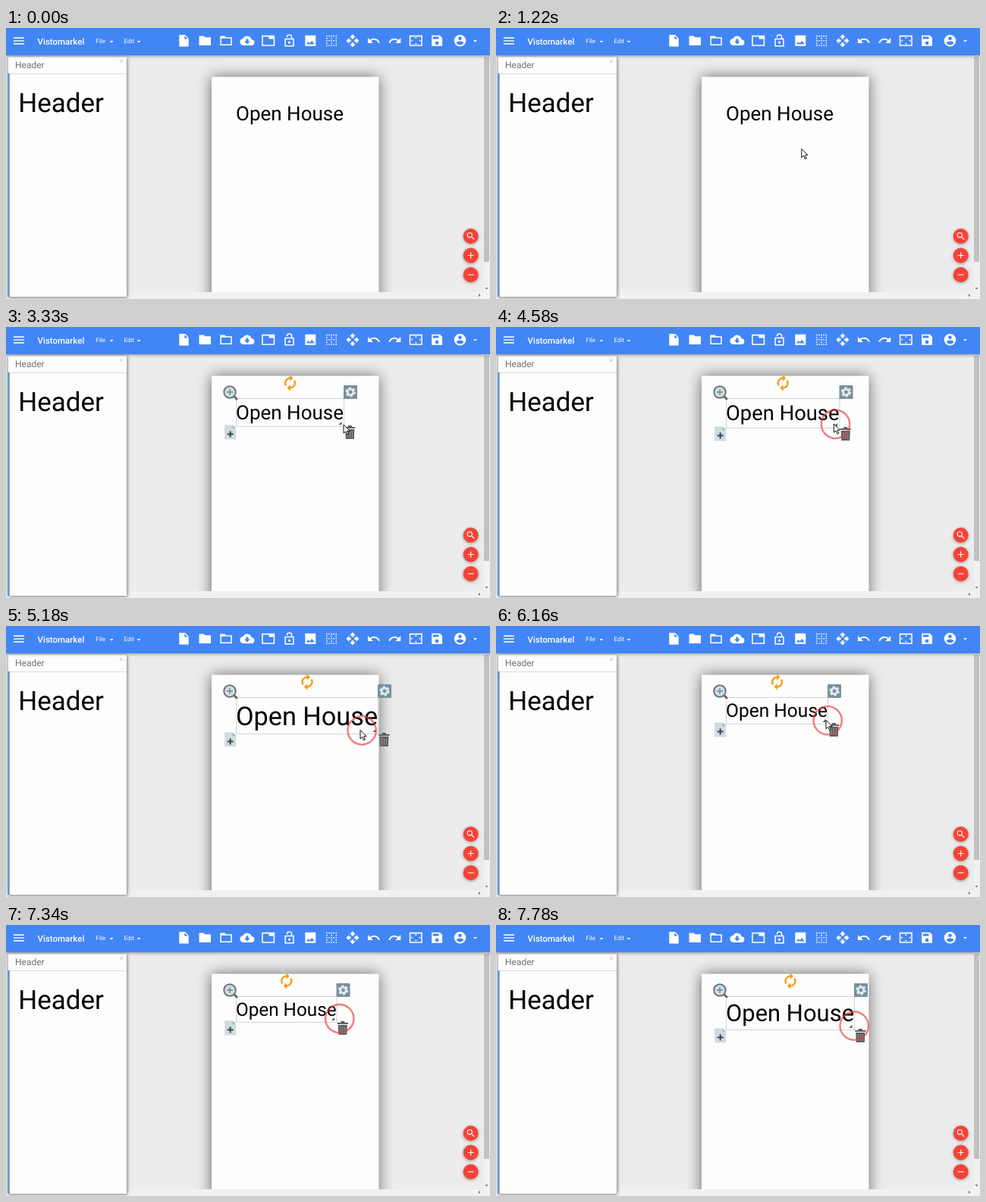
An HTML page that plays this animation: 638 by 358 pixels, repeating every 8 s.

```html
<!DOCTYPE html>
<html lang="en">
<head>
<meta charset="utf-8">
<title>Resize a text block</title>
<style>
  html, body { margin: 0; width: 100%; height: 100%; overflow: hidden; background: #ececec; }
  svg { display: block; width: 638px; height: 358px; font-family: Roboto, sans-serif; text-rendering: geometricPrecision; }
  .soft { filter: blur(2px); }
  .page-shadow { filter: blur(9.5px); }
</style>
</head>
<body>
<svg viewBox="0 0 638 358">
  <rect width="638" height="358" fill="#ececec"/>
  <rect class="page-shadow" x="271" y="65" width="220" height="320" opacity=".58"/>
  <rect x="271" y="64.5" width="220.5" height="300" fill="#fdfdfd"/>

  <rect id="hover" x="303" y="94" width="143" height="37.5" fill="#f1f4d8"/>
  <text id="label" x="303">Open House</text>
  <g id="handles">
    <rect id="outline" x="303.5" y="94.5" fill="none" stroke="#aaa" stroke-dasharray="1 1"/>
    <path id="corner" d="M2-2V2H-2z" fill="#555"/>
    <g transform="translate(295 86)">
      <path d="M5 5l4 4" stroke="#666" stroke-width="3" stroke-linecap="round"/>
      <circle r="7.7" fill="#d3e0e3" stroke="#6d7477" stroke-width="2"/>
      <path d="M-4 0H4M0-4V4" stroke="#7d9a9d" stroke-width="1.8"/>
    </g>
    <g id="add">
      <path d="M-7.5-9.5H3L7.5-5V9.5H-7.5z" fill="#cfdcdf"/>
      <path d="M3-9.5V-5H7.5z" fill="#a5b8bd"/>
      <path d="M-4 2.5H4M0-1.500V6.500" stroke="#37474f" stroke-width="2"/>
    </g>
    <g id="gear" fill="none" stroke="#dfe8ea">
      <rect x="-9" y="-9" width="18" height="18" rx="1" fill="#78909c" stroke="none"/>
      <circle r="3.9" stroke-width="3"/>
      <circle r="5.6" stroke-width="2.4" stroke-dasharray="2.93"/>
    </g>
    <g id="trash" fill="#5f5f5f">
      <path d="M-7-7H-2.500V-9H2.500V-7H7V-5H-7zM-6-4H6L5.500 9H-5.500z"/>
      <path d="M-3-2V7M0-2V7M3-2V7" stroke="#999"/>
    </g>
    <g id="turn"></g>
  </g>

  <path d="M0 349H638V358H0zM630 36H638V358H630z" fill="#f1f1f1"/>
  <rect x="630" y="38" width="7" height="271" fill="#c1c1c1"/>
  <path d="M631.500 343h4l-2 2.500zM623 351v4l2.500-2z" fill="#777"/>

  <rect class="soft" x="3" y="39" width="157" height="317" opacity=".5"/>
  <rect x="3" y="38" width="156" height="317" fill="#fdfdfd"/>
  <path d="M3 60.500H159" stroke="#ddd"/>
  <rect x="2.500" y="60" width="2.200" height="295" fill="#4a8fe0"/>
  <text x="12" y="52.700" font-size="12" fill="#707070">Header</text>
  <path d="M150 42l4 4m0-4l-4 4" stroke="#ccc"/>
  <text x="16.200" y="111" font-size="35">Header</text>

  <rect class="soft" x="-5" width="648" height="37" opacity=".4"/>
  <rect width="638" height="36" fill="#4285f4"/>
  <g id="bar" fill="#fff">
    <text x="41.500" y="21.500" font-size="11.500" font-weight="500">Vistomarkel</text>
    <text x="118.500" y="20" font-size="8">File</text>
    <text x="155.500" y="20" font-size="8">Edit</text>
    <path d="M136.500 17h5l-2.500 2.500zM172.500 17h5l-2.500 2.500zM616 16h5l-2.500 2.500z"/>
  </g>
  <g id="zoom"></g>

  <circle id="ring" r="18.700" fill="none" stroke="#e53e3e" stroke-opacity=".66" stroke-width="2.400"/>
  <path id="cursor" d="M0 0V11.500L2.700 9 4.700 13.400 6.500 12.600 4.600 8.300H8.200z" fill="#fff" stroke="#111"/>
</svg>
<script>
const $ = id => document.getElementById(id);
const set = (el, attrs) => { for (const name in attrs) el.setAttribute(name, attrs[name]); };
const make = (parent, tag, attrs) =>
  set(parent.appendChild(document.createElementNS('http://www.w3.org/2000/svg', tag)), attrs);
// Icons live on a 24-unit grid; overlapping outlines cut holes.
const icon = (parent, d, x, y, scale, more) => make(parent, 'path', {
  d, fill: '#fff', 'fill-rule': 'evenodd',
  transform: `translate(${x} ${y}) scale(${scale}) translate(-12 -12)`, ...more
});
const disc = (x, y, r) => `M${x - r} ${y}a${r} ${r} 0 1 0 ${2 * r} 0a${r} ${r} 0 1 0 ${-2 * r} 0z`;

let dots = '';
for (let x = 3; x < 20; x += 4)
  for (let y = 3; y < 20; y += 4)
    if (x % 8 === 3 || y % 8 === 3) dots += `M${x} ${y}h2v2h-2z`;

const folder = 'M2 4h8l2 2h10v14H2z';
const frame = 'M1 3h22v18H1z';
const menu = 'M3 6h18v2H3zM3 11h18v2H3zM3 16h18v2H3z';
const account = disc(12, 12, 10) + disc(12, 8, 3) + 'M6 16a7 7 0 0 0 12 0c0-2-4-3-6-3s-6 1-6 3z';
const tools = [
  'M4 2h10l6 6v14H4zM13 3.500V9h5.500z',
  folder,
  folder + 'M4 8v10h16V8z',
  'M6 20A6 6 0 0 1 5.400 8a7.500 7.500 0 0 1 14 2A5 5 0 0 1 19 20zM17 13h-3V9h-4v4H7l5 5z',
  frame + 'M3 5h10v4h8v10H3z',
  'M4 8h11V6a3 3 0 0 0-6 0H7a5 5 0 0 1 10 0v2h3v14H4zM6 10v10h12V10z' + disc(12, 15, 2),
  'M3 3h18v18H3zM5 18h14l-4.500-6-3.500 4.500-2.500-3z',
  dots,
  'M10 9V6H7l5-5 5 5h-3v3zM15 10h3V7l5 5-5 5v-3h-3zM14 15v3h3l-5 5-5-5h3v-3zM9 14H6v3l-5-5 5-5v3h3z',
  'M2 7v9h9l-3.600-3.600a8 8 0 0 1 12.700 3.600l2.400-.8A10.500 10.500 0 0 0 5.600 10.600z',
  'M22 7v9h-9l3.600-3.600a8 8 0 0 0-12.700 3.600l-2.400-.8A10.500 10.500 0 0 1 18.400 10.600z',
  frame + 'M3 5v14h18V5zM10 8l2-2.500 2 2.500zM18 10l2.500 2-2.500 2zM14 16l-2 2.500-2-2.500zM6 14l-2.500-2L6 10z',
  'M3 3h14l4 4v14H3zM5 5v4h10V5z' + disc(12, 16, 3)
];
const zooms = [
  disc(9.5, 9.5, 6.5) + disc(9.5, 9.5, 4.5) + 'M14 15.500l1.500-1.500 5.500 5.500-1.500 1.500z',
  'M5 11h6V5h2v6h6v2h-6v6h-2v-6H5z',
  'M5 11h14v2H5z'
];

icon($('bar'), menu, 17, 17, .78, { opacity: .9 });
tools.forEach((d, i) => icon($('bar'), d, 234.5 + i * 27.8, 16.8, .775));
icon($('bar'), account, 598.5, 16.8, .775);
zooms.forEach((d, i) => {
  const cx = 612.7, cy = 275 + i * 25.5;
  make($('zoom'), 'circle', { cx, cy: cy + 1, r: 10, opacity: .35, class: 'soft' });
  make($('zoom'), 'circle', { cx, cy, r: 10, fill: '#f44336' });
  icon($('zoom'), d, cx, cy, .56);
});
for (const scale of [.92, -.92])
  icon($('turn'), 'M12 6v3l4-4-4-4v3A8 8 0 0 0 5.200 16.300l1.500-1.500A6 6 0 0 1 12 6z', 0, 0, scale,
    { fill: '#f59c14', stroke: '#f59c14', 'stroke-width': .6 });

// Each move ends with the pointer at x, y and the block's right edge at right.
const rest = { x: 408, y: 186, right: 445.5 };
const moves = [
  { from: 1060, to: 1680, x: 395, y: 120 },
  { from: 2120, to: 2870, x: 439, y: 124 },
  { from: 3070, to: 3330, x: 445, y: 129 },
  { from: 3770, to: 4140, x: 441, y: 126 },
  { from: 4450, to: 5180, x: 467, y: 137.5, right: 490.5 },
  { from: 5700, to: 6160, x: 435, y: 124.3, right: 437.5 },
  { from: 6320, to: 6760, x: 405, y: 113.7, right: 399.5 },
  { from: 7040, to: 7780, x: 470, y: 132.7, right: 472.5 }
];

// Moves advance in even hops, about 150 ms apart.
function pose(t) {
  let now = rest;
  for (const move of moves) {
    if (t < move.from) break;
    const gaps = Math.round((move.to - move.from) / 150);
    const hop = Math.floor((t - move.from) / (move.to - move.from) * gaps + 1.02);
    const p = Math.min(1, hop / (gaps + 1));
    const mix = key => now[key] + ((move[key] ?? now[key]) - now[key]) * p;
    now = { x: mix('x'), y: mix('y'), right: mix('right') };
  }
  return now;
}

const place = (id, x, y) => set($(id), { transform: `translate(${x} ${y})` });
const show = (id, on) => set($(id), { visibility: on ? 'visible' : 'hidden' });

function draw(now) {
  const t = now % 8000;
  const { x, y, right } = pose(t);
  const width = right - 303.5, size = width / 5.458;
  const height = Math.floor(size * 1.4286), bottom = 94.5 + height;
  const selected = t >= 2120, hovered = !selected && y < 131;

  set($('label'), { 'font-size': size, y: 94.5 + size * 1.0555, fill: hovered ? '#60615a' : '#000' });
  set($('outline'), { width, height });
  place('corner', right - 5, bottom - 4.5);
  place('add', 295.7, bottom + 7.5);
  place('gear', right + 8.5, 86);
  place('trash', right + 7.8, bottom + 7.5);
  place('turn', (303.5 + right) / 2, 74);
  place('ring', x + 2.2, y + .5);
  place('cursor', x, y);
  show('hover', hovered);
  show('handles', selected);
  show('ring', t >= 4450 || t >= 1980 && !selected);
  show('cursor', t >= 1060 && t < 6600);
  requestAnimationFrame(draw);
}
requestAnimationFrame(draw);
</script>
</body>
</html>
```
